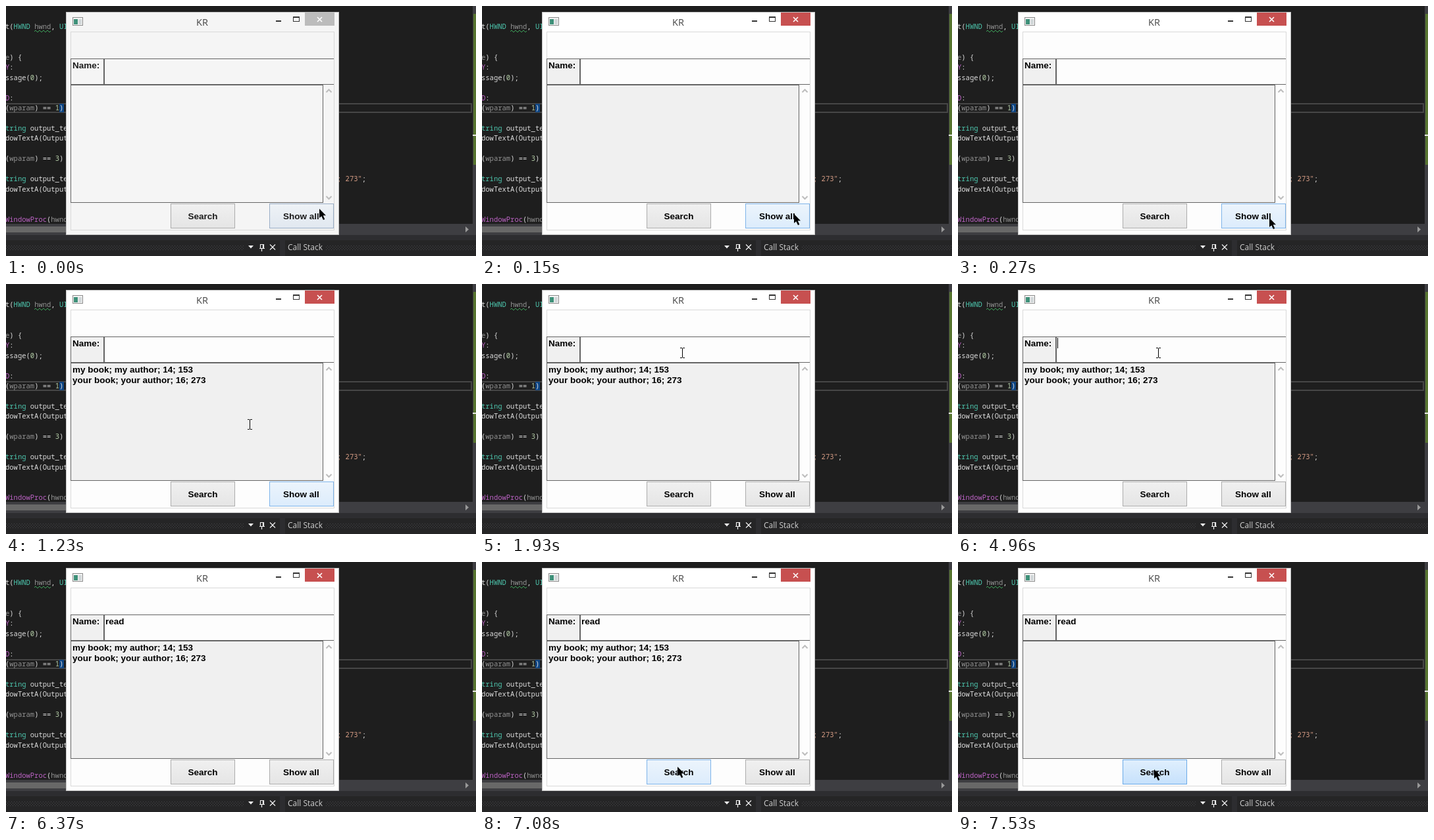
An HTML page that plays this animation: 714 by 381 pixels, repeating every 8000 ms.

```html
<!DOCTYPE html>
<html lang="en">
<head>
<meta charset="utf-8">
<title>Book search window</title>
<style>
  html, body { margin: 0; width: 100%; height: 100%; overflow: hidden; background: #1e1e1e; }
  svg { display: block; width: 714px; height: 381px; }
  text { white-space: pre; }
  .crisp { shape-rendering: crispEdges; }
  .code { font: 10.5px "Noto Sans Mono", monospace; fill: #dcdcdc; }
  .type { fill: #4ec9b0; }
  .dim { fill: #929292; }
  .macro { fill: #bd63c5; }
  .num { fill: #b5cea8; }
  .str { fill: #d69d85; }
  .ui { font: bold 13.5px "Liberation Sans", Arial, sans-serif; fill: #000; }
  .frame { stroke: #646464; }
  .glyph { fill: none; stroke: #333; }
  .win { fill: #fff; }
  .client, .field { fill: #fdfdfd; }
  .list { fill: #f0f0f0; }
  .close { fill: #c75050; }
  .inactive :is(.win, .client, .field, .list) { fill: #f5f5f5; }
  .inactive .close { fill: #bcbcbc; }
  .inactive .ui { fill: #1c1c1c; }
  .btn { fill: url(#normal); stroke: #acacac; }
  .btn.half { fill: url(#half); stroke: #9aaec6; }
  .btn.hover { fill: url(#hover); stroke: #7eb4ea; }
  .btn.down { fill: url(#down); stroke: #6aaae8; }
</style>
</head>
<body>
<svg viewBox="0 0 714 381">
  <defs>
    <linearGradient id="normal" x2="0" y2="1"><stop stop-color="#f0f0f0"/><stop offset="1" stop-color="#e5e5e5"/></linearGradient>
    <linearGradient id="half" x2="0" y2="1"><stop stop-color="#eef2f6"/><stop offset="1" stop-color="#e1e8f0"/></linearGradient>
    <linearGradient id="hover" x2="0" y2="1"><stop stop-color="#ecf4fc"/><stop offset="1" stop-color="#dcecfc"/></linearGradient>
    <linearGradient id="down" x2="0" y2="1"><stop stop-color="#e0effd"/><stop offset="1" stop-color="#c6e1fc"/></linearGradient>
    <pattern id="dots" x="0" y="365" width="4" height="4" patternUnits="userSpaceOnUse">
      <path d="M0 0h1v1h-1zM2 2h1v1h-1z" fill="#46464a"/>
    </pattern>
  </defs>

  <!-- editor behind the window -->
  <rect width="714" height="381" fill="#1e1e1e"/>
  <g class="crisp">
    <path d="M0 149H707V162H0" fill="none" stroke="#464646" stroke-width="2"/>
    <rect x="81" y="149" width="7" height="13" fill="#0e4583"/>
    <rect x="709" width="5" height="333" fill="#3e3e42"/>
    <rect x="710" y="12" width="4" height="230" fill="#577430"/>
    <rect x="709" y="196" width="5" height="2" fill="#e8e8e8"/>
    <rect y="332" width="714" height="17" fill="#3e3e42"/>
    <rect y="336" width="92" height="9" fill="#686868"/>
    <rect y="349" width="714" height="32" fill="#2d2d30"/>
    <rect y="357" width="416" height="24" fill="#252526"/>
    <rect x="424" y="357" width="290" height="24" fill="#252526"/>
    <rect y="365" width="361" height="7" fill="url(#dots)"/>
    <rect x="486" y="365" width="228" height="7" fill="url(#dots)"/>
  </g>
  <path d="M698 336v9l5-4.500z" fill="#999"/>
  <g class="code">
    <text x="-1" y="35">t(<tspan class="type">HWND</tspan> <tspan class="dim">hwnd</tspan>, <tspan class="type">UINT</tspan></text>
    <text x="-1" y="82"><tspan class="dim">e</tspan>) {</text>
    <text x="-1" y="97"><tspan class="macro">Y</tspan>:</text>
    <text x="-1" y="113">ssage(<tspan class="num">0</tspan>);</text>
    <text x="-1" y="144"><tspan class="macro">D</tspan>:</text>
    <text x="-1" y="159">(<tspan class="dim">wparam</tspan>) == <tspan class="num">1</tspan>)</text>
    <text x="-1" y="190"><tspan class="type">tring</tspan> output_te</text>
    <text x="-1" y="205">dowTextA(Output</text>
    <text x="-1" y="236">(<tspan class="dim">wparam</tspan>) == <tspan class="num">3</tspan>)</text>
    <text x="-1" y="267"><tspan class="type">tring</tspan> output_te</text>
    <text x="503" y="267"><tspan class="str">; 273"</tspan>;</text>
    <text x="-1" y="283">dowTextA(Output</text>
    <text x="-1" y="329"><tspan class="macro">WindowProc</tspan>(<tspan class="dim">hwnd</tspan></text>
  </g>
  <path d="M43 39l2-2 3 3 3-3 3 3 3-3 3 3 3-3 3 3 2-2" fill="none" stroke="#3fa45b"/>
  <path d="M368 365h8l-4 4.500z" fill="#f1f1f1"/>
  <path d="M386.500 363v6M391.500 363v6M390.500 363v6M386 363.500h6M385 369.500h8M388.500 370v4M401 363.500l8 8M409 363.500l-8 8" fill="none" stroke="#f1f1f1" stroke-width="1.200"/>
  <text x="428" y="372" font-family="Open Sans, sans-serif" font-size="12" fill="#d0d0d0">Call Stack</text>

  <!-- dialog -->
  <g id="window">
    <rect class="win" x="91.500" y="9.500" width="414" height="339" stroke="#c4c4c4"/>
    <rect class="client" x="98.500" y="39.500" width="400" height="302" stroke="#d9d9d9"/>
    <g class="crisp">
      <rect x="101.500" y="17.500" width="15" height="12" fill="#f4f4f4" stroke="#8a8a8a"/>
      <rect x="103" y="20" width="6" height="8" fill="#3d8f78"/>
      <rect x="110" y="20" width="5" height="8" fill="#d2d8da"/>
      <rect x="410" y="22" width="8" height="2" fill="#333"/>
      <path class="glyph" d="M436.500 16.500h9v7h-9zM436 17.500h10"/>
      <rect class="close" x="454" y="10" width="45" height="20"/>
    </g>
    <path d="M473 17l7 7M480 17l-7 7" stroke="#fff" stroke-width="1.600"/>
    <text x="298" y="30" text-anchor="middle" font-family="Open Sans, sans-serif" font-size="14.500" fill="#444">KR</text>

    <g class="crisp">
      <rect class="list frame" x="98.500" y="80.500" width="50" height="39"/>
      <rect class="field" x="150" y="81" width="348" height="38"/>
      <path class="frame" d="M498 80.500H149.500V119.500H498" fill="none"/>
      <rect class="list frame" x="98.500" y="120.500" width="383" height="179"/>
      <rect id="search" class="btn" x="250.500" y="301.500" width="97" height="37"/>
      <rect id="showAll" class="btn" x="400.500" y="301.500" width="97" height="37"/>
    </g>
    <path d="M486.500 131.500l4-4 4 4M486.500 290l4 4 4-4" fill="none" stroke="#bdbdbd" stroke-width="2"/>
    <g class="ui">
      <text class="ui" x="101" y="95">Name:</text>
      <text class="ui" id="query" x="151" y="95"></text>
      <g id="results">
        <text class="ui" x="101" y="135">my book; my author; 14; 153</text>
        <text class="ui" x="101" y="151">your book; your author; 16; 273</text>
      </g>
      <text class="ui" x="299" y="325" text-anchor="middle">Search</text>
      <text class="ui" x="448.500" y="325" text-anchor="middle">Show all</text>
    </g>
  </g>
  <rect id="caret" class="crisp" y="82" width="1" height="16"/>
  <path id="arrow" d="M0 0V14L3.200 11.200L6 17L8.300 16L5.700 10.300H10Z"/>
  <path id="beam" class="crisp" d="M-3 -7.500H0M1 -7.500H4M.5 -7V7M-3 7.500H0M1 7.500H4" fill="none" stroke="#000"/>
</svg>
<script>
  const LOOP = 8000;
  const el = id => document.getElementById(id);

  // each track lists [start time, value...]; values hold until the next entry
  const tracks = {
    active: [[0, false], [150, true]],
    results: [[0, false], [430, true], [7530, false]],
    showAll: [[0, 'half'], [150, 'hover'], [1930, '']],
    search: [[0, ''], [6940, 'half'], [7080, 'hover'], [7530, 'down']],
    query: [[0, ''], [5270, 'r'], [5410, 're'], [5660, 'rea'], [5780, 'read']],
    caret: [[0, 0], [2630, 151], [3190, 0], [3720, 151], [4300, 0], [4960, 151],
      [5270, 156], [5410, 164], [5660, 171], [5780, 180], [6370, 0], [7230, 180], [7390, 0]],
    pointer: [[0, 'arrow', 476, 309], [150, 'arrow', 474, 317], [270, 'arrow', 473, 323],
      [690, 'arrow', 465, 319], [810, 'arrow', 451, 321], [960, 'arrow', 434, 317],
      [1080, 'arrow', 417, 320], [1230, 'beam', 370, 214], [1380, 'beam', 340, 163],
      [1500, 'beam', 311, 122], [1650, 'beam', 304, 105], [5270, ''],
      [6510, 'beam', 308, 109], [6630, 'beam', 362, 187], [6790, 'beam', 415, 243],
      [6940, 'arrow', 297, 312], [7230, 'arrow', 298, 316]]
  };
  const at = (name, t) => tracks[name].findLast(step => step[0] <= t).slice(1);
  const show = (id, on) => { el(id).style.display = on ? '' : 'none'; };

  function draw(t) {
    el('window').classList.toggle('inactive', !at('active', t)[0]);
    show('results', at('results', t)[0]);
    for (const id of ['showAll', 'search']) el(id).setAttribute('class', 'btn ' + at(id, t)[0]);
    el('query').textContent = at('query', t)[0];

    const [caret] = at('caret', t);
    show('caret', caret);
    el('caret').setAttribute('x', caret);

    const [kind, x, y] = at('pointer', t);
    for (const id of ['arrow', 'beam']) show(id, id === kind);
    if (kind) el(kind).setAttribute('transform', `translate(${x} ${y})`);
  }

  const start = performance.now();
  function tick() {
    draw((performance.now() - start) % LOOP);
    requestAnimationFrame(tick);
  }
  tick();
</script>
</body>
</html>
```
